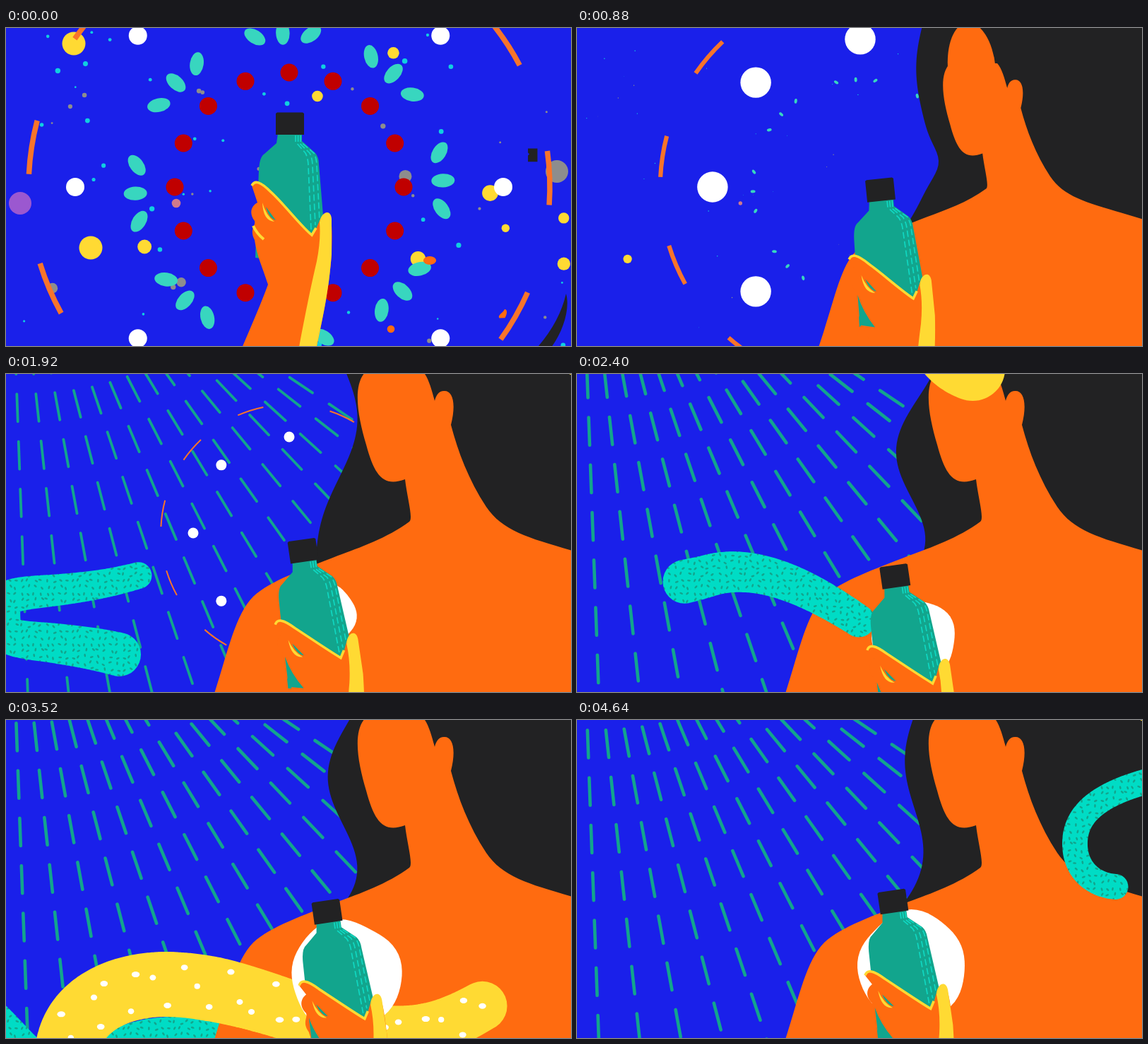
Animation, 800 px wide and 450 px high, one loop 4.72 s. Source, as an HTML page with a canvas:

```html
<!DOCTYPE html>
<html>
<head>
<meta charset="utf-8">
<style>
html, body { margin: 0; width: 100%; height: 100%; overflow: hidden; background: #1a20ea; }
canvas { display: block; }
</style>
</head>
<body>
<canvas id="stage" width="800" height="450"></canvas>
<script>
const c = document.getElementById('stage').getContext('2d');
const LOOP = 4720, STEP = 80, TAU = Math.PI * 2, RAD = Math.PI / 180;
const BLUE = '#1a20ea', ORANGE = '#ff6b10', DARK = '#222223', YELLOW = '#ffda33', WHITE = '#fff',
  GLASS = '#12a58d', AQUA = '#00dcc5', PETAL = '#38d6bf', RED = '#c00000', GREY = '#8d8d8d', PURPLE = '#9b58d0';

const lerp = (a, b, k) => a + (b - a) * k;
const smooth = k => (k = Math.max(0, Math.min(1, k)), k * k * (3 - 2 * k));
const random = n => { const v = Math.sin(n * 127.1 + 11.7) * 43758.5453; return v - Math.floor(v); };

// Linear interpolation through [time, value] pairs
function key(t, ...pairs) {
  if (t <= pairs[0][0]) return pairs[0][1];
  for (let i = 1; i < pairs.length; i++) {
    const [t0, a] = pairs[i - 1], [t1, b] = pairs[i];
    if (t <= t1) return lerp(a, b, (t - t0) / (t1 - t0));
  }
  return pairs[pairs.length - 1][1];
}

function ellipse(x, y, rx, ry, color, turn = 0) {
  if (rx <= 0 || ry <= 0) return;
  c.beginPath();
  c.ellipse(x, y, rx, ry, turn, 0, TAU);
  c.fillStyle = color;
  c.fill();
}
const dot = (x, y, r, color) => ellipse(x, y, r, r, color);
function shape(d, color) {
  c.fillStyle = color;
  c.fill(new Path2D(d));
}
function line(d, color, width, dash = []) {
  c.strokeStyle = color;
  c.lineWidth = width;
  c.setLineDash(dash);
  c.stroke(new Path2D(d));
  c.setLineDash([]);
}
function scaled(x, y, s, draw) {
  c.save();
  c.translate(x, y);
  c.scale(s, s);
  c.translate(-x, -y);
  draw();
  c.restore();
}

// Dashes stream outwards along columns that fan open to the right
function drawRays(t) {
  const width = key(t, [1120, 0], [1280, 1.3], [1920, 3.8], [2300, 4.6]);
  if (!width) return;
  const period = 67.3, flow = (t - 2800) * .0691;
  c.strokeStyle = GLASS;
  c.lineWidth = width;
  c.lineCap = 'round';
  c.beginPath();
  for (let i = 0; i < 14; i++) {
    const x = 15 + i * (26.4 + .03 * i * i), a = (2.1 + 4.15 * i) * RAD;
    const start = (flow + 2 - .361 * i ** 2.4) % period;
    for (let s = start - period * 2; s < 560; s += period) {
      c.moveTo(x + Math.sin(a) * s, 20 + Math.cos(a) * s);
      c.lineTo(x + Math.sin(a) * (s + 39), 20 + Math.cos(a) * (s + 39));
    }
  }
  c.stroke();
  c.lineCap = 'butt';
}

function around(count, radius, draw) {
  for (let i = 0; i < count; i++) {
    const a = i * TAU / count;
    draw(401 + radius * Math.cos(a), 225 + radius * Math.sin(a));
  }
}

function drawRings(t) {
  const red = key(t, [0, 12.5], [480, 0]);
  around(16, key(t, [0, 162], [560, 125]), (x, y) => dot(x, y, red, RED));

  const size = key(t, [0, 1], [560, .62], [1040, 0]), reach = 218 - t * .075;
  for (let i = 0; i < 24; i++) {
    const side = i % 3 - 1, a = (Math.floor(i / 3) * 45 - 2.4 + side * 10.5) * RAD;
    ellipse(401 + reach * Math.cos(a), 225 + reach * Math.sin(a), 16.5 * size, 9.7 * size, PETAL, a + side * 45 * RAD);
  }

  const white = key(t, [0, 13], [560, 23.5], [1280, 19.5], [1920, 7.5], [2240, 0]);
  around(8, key(t, [0, 303], [560, 240], [1280, 170.5], [1920, 136], [2240, 122]), (x, y) => dot(x, y, white, WHITE));

  const width = key(t, [0, 7.5], [560, 7], [1280, 5], [1920, 2], [2240, 0]);
  if (!width) return;
  c.strokeStyle = '#f8742a';
  c.lineWidth = width;
  for (let i = 0; i < 11; i++) {
    const a = (-65.6 + i * 31.8) * RAD;
    c.beginPath();
    c.arc(401, 225, 369 - t * .0975, a - .104, a + .104);
    c.stroke();
  }
}

function drawConfetti(t) {
  if (t > 1100) return;
  const fade = 1 - t / 1120, shrink = Math.max(0, 1 - t / 640);
  for (let i = 0; i < 70; i++) {
    const x = random(i) * 800, y = random(i + 80) * 450, drift = t * .00012, big = i < 12;
    const r = big ? (5 + random(i + 160) * 7) * shrink : (1.2 + random(i + 160) * 2.6) * fade;
    dot(x + (x - 400) * drift, y + (y - 225) * drift, r, i % 3 == 0 ? GREY : big ? YELLOW : '#10cfe0');
  }
  dot(96 - t * .03, 22, 16.5 * shrink, YELLOW);
  dot(780 + t * .04, 203, 16 * shrink, GREY);
  dot(120 - t * .055, 311 + t * .018, key(t, [0, 16.5], [560, 18.5], [1040, 0]), YELLOW);
  dot(20 - t * .043, 248, 16, PURPLE);
  dot(241 - t * .011, 248, 6.3 * Math.min(1, fade * 2), '#cf7a8c');
}

// Worms slide along a path; "at" pins the head to a place at a time
function makeWorm(d, at, speed, length, tail, head, taper = 250) {
  const path = document.createElementNS('http://www.w3.org/2000/svg', 'path');
  path.setAttribute('d', d);
  const points = [];
  for (let s = 0; s < path.getTotalLength(); s += 2) {
    const p = path.getPointAtLength(s);
    points.push([p.x, p.y]);
  }
  const gap = p => Math.hypot(p[0] - at[1], p[1] - at[2]);
  const pin = 2 * points.reduce((best, p, i) => gap(p) < gap(points[best]) ? i : best, 0);
  return { points, pin, time: at[0], speed, length, tail, head, taper };
}

const aquaWorms = [
  makeWorm('M560,560 C470,510 350,450 278,444 C200,400 130,388 60,380 C0,374 -5,372 -5,343 C-5,315 0,312 60,307 C110,302 150,296 188,285 C260,265 340,310 400,350',
    [1920, 188, 285], .77, 405, 31, 19, 400),
  makeWorm('M375,428 Q330,446 280,446 C220,440 175,400 147,361 C120,320 70,300 30,360 Q-10,430 -100,560',
    [2800, 147, 361], .9, 400, 36, 36),
  makeWorm('M1000,60 C760,75 705,120 705,175 C705,215 735,235 764,236',
    [4640, 764, 236], .9, 600, 23, 18)];
const aquaBehind = makeWorm('M520,520 C420,470 330,455 240,455 C150,455 140,500 80,500 C20,500 10,450 -60,400',
  [3520, -40, 414], .9, 640, 35, 35);
const yellowWorm = makeWorm('M480,-400 C480,-100 500,-30 560,-8 C640,20 700,55 735,110 C760,165 760,240 757,290 Q755,320 745,343 C730,375 700,392 672,406 C630,430 590,448 520,442 C430,430 330,374 225,374 C140,375 75,420 88,500 L90,720',
  [2800, 745, 343], 1.13, 718, 35, 46, 400);

function makeFlecks() {
  const tile = document.createElement('canvas'), g = tile.getContext('2d');
  tile.width = tile.height = 72;
  g.fillStyle = AQUA;
  g.fillRect(0, 0, 72, 72);
  g.fillStyle = GLASS;
  for (let i = 0; i < 64; i++) {
    g.beginPath();
    g.ellipse(i % 8 * 9 + 2 + random(i) * 5, Math.floor(i / 8) * 9 + 2 + random(i + 70) * 5, 2.5, 1.3, random(i + 140) * 3, 0, TAU);
    g.fill();
  }
  return c.createPattern(tile, 'repeat');
}
const flecks = makeFlecks();

function drawWorm(worm, t, color, dotted) {
  const front = worm.pin + (t - worm.time) * worm.speed;
  const radius = s => lerp(worm.tail, worm.head, Math.min(1, s / worm.taper));
  const point = s => worm.points[Math.round((front - worm.length + s) / 2)];
  c.beginPath();
  for (let s = 0; s <= worm.length; s += 2) {
    const p = point(s);
    if (!p) continue;
    c.moveTo(p[0] + radius(s), p[1]);
    c.arc(...p, radius(s), 0, TAU);
  }
  c.fillStyle = color;
  c.fill();
  if (!dotted) return;
  for (let i = 0, s = 0; s < worm.length; i++, s += 21) {
    const p = point(s), q = point(s + 4);
    if (!p || !q) continue;
    const side = Math.sin(i * 2.2) * radius(s) * .68, n = Math.hypot(q[0] - p[0], q[1] - p[1]) || 1;
    ellipse(p[0] - (q[1] - p[1]) / n * side, p[1] + (q[0] - p[0]) / n * side, 4 + random(i) * 1.8, 4, WHITE);
  }
}

const orbit = t => (71 + (t - 1280) * .2875) * RAD;

// The hair swings like a rope, in step with the hand
function hairX(t, y) {
  const a = orbit(t), swing = 30 * Math.sin((y - 20) * Math.PI / 150) - 4, ripple = 14 * Math.sin((y - 90) * Math.PI / 150);
  const hair = 480 - 20 * (y / 240) ** 4 + swing * Math.cos(a - 200 * RAD) + ripple * Math.cos(2 * a + 60 * RAD);
  const liquid = 525 + 50 * Math.exp(-(((y - 190) / 30) ** 2));
  return lerp(liquid, hair, smooth((t - 560) / 480));
}

function drawHair(t) {
  c.beginPath();
  for (let y = -10; y <= 280; y += 6) c.lineTo(hairX(t, y), y);
  c.lineTo(hairX(t, 280), t < 900 ? 460 : 310);
  c.lineTo(860, 460);
  c.lineTo(860, -10);
  c.fillStyle = DARK;
  c.fill();
}

function drawLiquid(t) {
  const grow = key(t, [0, .1], [560, 1], [880, 1.35]);
  const drop = (x, y, rx, ry, turn) => ellipse(x, y, rx * grow, ry * grow, ORANGE, turn);
  if (t < 400) shape('M793,376 C800,400 785,440 765,460 L745,460 Q783,420 793,376Z', DARK);
  if (t > 400 && t < 720) {
    shape('M639,88 Q660,135 628,165 Q637,130 639,88Z', BLUE);
    shape('M715,57 Q758,65 765,115 Q748,76 715,57Z', BLUE);
    shape('M585,388 L672,382 L620,450 L595,450Z', BLUE);
    dot(620, 428, 30, DARK);
  }
  if (t > 300) {
    drop(559, 58, 25, 49, -.1);
    drop(618, 161, 12, 28, -.07);
  }
  drop(600, 329, 91, 61);
  drop(545, 426, 53, 53);
  scaled(705, 405, grow, () => shape('M715,335 C755,335 755,395 720,458 L640,460 C610,420 690,390 715,335Z', ORANGE));
}

const body = 'M510,-4 C490,15 498,60 510,100 C522,145 535,160 565,149 C568,175 577,205 571,209 C540,232 500,246 470,257 ' +
  'C420,277 375,292 350,315 C325,340 315,390 295,452 L240,620 L1200,620 L1200,372 L802,250 C740,232 703,222 680,188 ' +
  'C655,150 640,110 630,72 C638,40 632,23 620,24 C613,24 609,30 607,38 C602,20 598,5 590,-4Z';

function drawWoman(t) {
  scaled(748, 178, key(t, [0, .04], [560, 1]), () => drawHair(t));
  if (t < 960) drawLiquid(t);
  if (t > 680) scaled(620, 320, lerp(.6, 1, smooth((t - 680) / 360)), () => shape(body, ORANGE));
}

function handPlace(t) {
  const a = orbit(t), k = smooth((t - 560) / 600), rise = Math.min(1, t / 560);
  return [lerp(402 + 6 * rise, 427.5 + 27 * Math.cos(a), k), lerp(135 + 60 * rise, 273 + 24 * Math.sin(a), k)];
}

function drawSplash(t, x, y) {
  const r = key(t, [1000, 0], [1280, 35], [1920, 47], [2800, 68], [3520, 78], [4640, 76]);
  c.beginPath();
  for (let a = 0; a < TAU; a += .1) {
    const wave = r * (1 + .03 * Math.sin(a * 3 + t * .004) + .02 * Math.sin(a * 5 - t * .006));
    c.lineTo(x + 27 + wave * Math.cos(a), y + 91 + wave * Math.sin(a));
  }
  c.fillStyle = WHITE;
  c.fill();
}

function drawBottle(t, x, y) {
  const droop = key(t, [560, 0], [1120, 10]), low = y => y + droop;
  const finger = `M-54,${low(88)} C-50,${low(80)} -42,${low(82)} -27,${low(97)} C-10,${low(112)} 15,145 31,158`;
  c.save();
  c.translate(x, y);
  c.rotate(key(t, [0, 0], [560, -2.5], [1120, -8.3]) * RAD);
  shape('M-17,14 H17 V25 L36,42 Q41,48 41,58 L47,130 L32,160 L20,200 L-49,190 L-44,66 Q-43,47 -36,43 L-19,28Z', GLASS);
  for (const d of [0, 6, 12])
    line(`M${8 + d * .6},17 v9 L${22 + d},42 Q${26 + d},50 ${26 + d},60 L${30 + d},${150 - d}`, '#10d8c2', 1.7, [9, 4]);
  shape('M-20,-14 L-18,-15.5 H18 L20,-14 V16 H-20Z', DARK);
  if (t > 300 && t < 960) ellipse(-37, 212, 17, 29, ORANGE);
  shape(finger + ' C40,150 42,127 53,127 C60,130 60,150 59,185 C54,250 45,280 20,400 H-100 C-80,340 -50,280 -31,228 ' +
    'C-40,200 -46,190 -50,165 C-58,150 -48,145 -50,138 C-60,125 -52,115 -46,112Z', ORANGE);
  shape('M42,140 C44,125 58,120 59,135 V185 C54,250 45,280 20,400 H-2 C10,330 25,250 38,195 Q44,165 42,140Z', YELLOW);
  line(finger + ' L37,148', YELLOW, 3.5);
  shape(`M-39,${low(112)} Q-34,${low(130)} -22,${low(139)} Q-38,${low(138)} -39,${low(112)}Z`, YELLOW);
  shape(`M-34,${low(118)} L-20,${low(137)} Q-30,${low(134)} -34,${low(118)}Z`, GLASS);
  if (t > 300) shape('M-47,145 Q-42,170 -27,193 L-48,188Z', GLASS);
  else line('M-52,145 Q-47,156 -37,164', YELLOW, 4);
  c.restore();
}

function draw(t) {
  const place = handPlace(t);
  c.fillStyle = BLUE;
  c.fillRect(0, 0, 800, 450);
  drawRays(t);
  drawConfetti(t);
  drawRings(t);
  drawWorm(aquaBehind, t, flecks);
  drawWoman(t);
  dot(850, -100, key(t, [1040, 0], [1280, 127], [1920, 113], [2300, 100], [4400, 100], [4640, 113]), YELLOW);
  for (const worm of aquaWorms) drawWorm(worm, t, flecks);
  drawWorm(yellowWorm, t, YELLOW, true);
  drawSplash(t, ...place);
  drawBottle(t, ...place);
}

function loop() {
  draw(Math.floor(performance.now() % LOOP / STEP) * STEP);
  requestAnimationFrame(loop);
}
loop();
</script>
</body>
</html>
```
